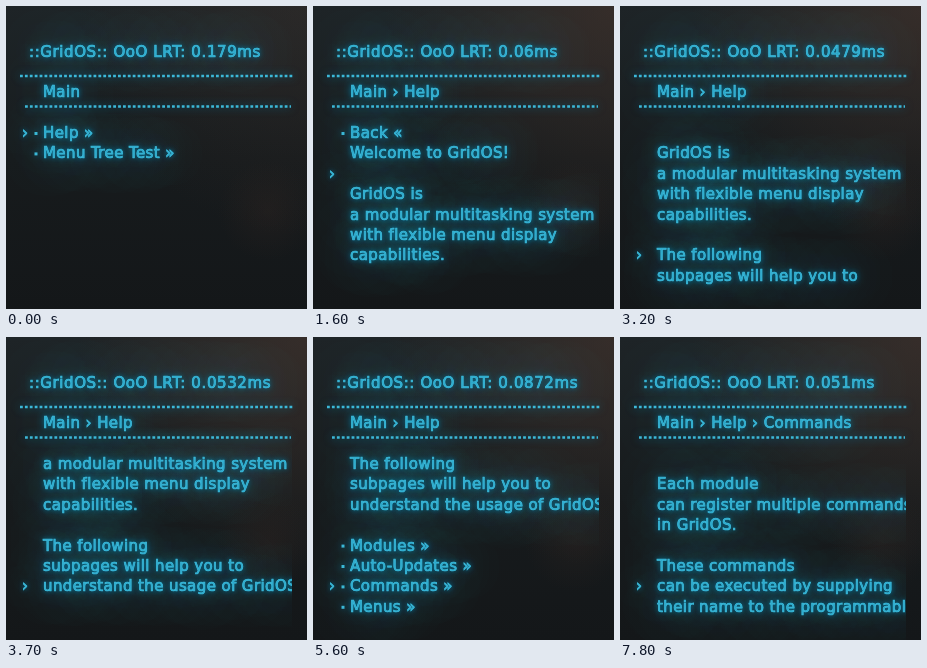
Write an HTML page with a canvas that moves like this. It is 301 px wide and 303 px high and loops after 8000 ms.

```html
<!DOCTYPE html>
<html lang="en">
<head>
<meta charset="utf-8">
<title>GridOS menu</title>
<style>
  html, body { margin: 0; width: 100%; height: 100%; overflow: hidden; background: #15181a; }
  canvas { display: block; }
</style>
</head>
<body>
<canvas id="screen" width="301" height="303"></canvas>
<script>
const W = 301, H = 303, LOOP = 8000;
const ROWS = 8, ROW_HEIGHT = 20.4, FIRST_BASELINE = 132, LAST_CURSOR_ROW = 6;
const ctx = document.getElementById('screen').getContext('2d');

// A leading "*" marks a selectable item with a bullet.
const pages = {
  main: { path: 'Main', lines: ['*Help »', '*Menu Tree Test »'] },
  help: {
    path: 'Main › Help',
    lines: ['*Back «', 'Welcome to GridOS!', '', 'GridOS is',
      'a modular multitasking system', 'with flexible menu display', 'capabilities.', '',
      'The following', 'subpages will help you to', 'understand the usage of GridOS:', '',
      '*Modules »', '*Auto-Updates »', '*Commands »', '*Menus »']
  },
  commands: {
    path: 'Main › Help › Commands',
    lines: ['*Back «', 'About commands:', '', 'Each module',
      'can register multiple commands', 'in GridOS.', '', 'These commands',
      'can be executed by supplying', 'their name to the programmable']
  }
};

// Times at which the cursor reaches line 0, 1, 2, ...
const visits = [
  { page: pages.main, steps: [0] },
  { page: pages.help, steps: [1000, 1300, 1600, 1900, 2100, 2400, 2600, 2900, 3200,
    3400, 3700, 3900, 4200, 4500, 4700] },
  { page: pages.commands, steps: [5700, 6200, 6500, 6700, 6800, 7000, 7200, 7400, 7700] }
];

// Header status: start time, spinner and run time.
const statuses = [
  [0, 'OoO', '0.179'], [100, 'OOo', '0.0535'], [600, 'OoO', '0.0521'], [1300, 'OOo', '0.0588'],
  [1600, 'OoO', '0.06'], [1700, 'OOo', '0.0612'], [2100, 'OoO', '0.0547'], [2400, 'OOo', '0.0539'],
  [2600, 'OoO', '0.0526'], [2900, 'OOo', '0.0561'], [3200, 'OoO', '0.0479'], [3400, 'OOo', '0.0518'],
  [3700, 'OoO', '0.0532'], [4200, 'OOo', '0.0541'], [4500, 'OoO', '0.0529'], [4900, 'OOo', '0.0558'],
  [5600, 'OoO', '0.0872'], [5800, 'OOo', '0.0564'], [6200, 'OoO', '0.0537'], [6700, 'OOo', '0.0516'],
  [6800, 'OoO', '0.0523'], [7000, 'OOo', '0.0544'], [7200, 'OoO', '0.0519'], [7400, 'OOo', '0.0528'],
  [7700, 'OoO', '0.051']
];

function gradient(g, ...stops) {
  stops.forEach(([at, color]) => g.addColorStop(at, color));
  ctx.fillStyle = g;
  ctx.fillRect(0, 0, W, H);
}

function drawBackground(warmth) {
  ctx.shadowBlur = 0;
  gradient(ctx.createLinearGradient(0, 0, 0, H), [0, '#1e2427'], [0.5, '#171b1d'], [1, '#141719']);
  gradient(ctx.createRadialGradient(W, 0, 0, W, 0, 230),
    [0, `rgba(66,50,43,${warmth})`], [1, 'rgba(66,50,43,0)']);
  gradient(ctx.createRadialGradient(262, 205, 0, 262, 205, 50),
    [0, 'rgba(60,42,36,.25)'], [1, 'rgba(60,42,36,0)']);
}

function glow(blur, alpha) {
  ctx.shadowColor = `rgba(0,125,165,${alpha})`;
  ctx.shadowBlur = blur;
}

// Wide haze, close halo, then a thin outline that thickens the letters.
function write(text, x, y) {
  glow(42, 0.85);
  ctx.fillText(text, x, y);
  glow(9, 1);
  ctx.fillText(text, x, y);
  glow(4, 0.9);
  ctx.setLineDash([]);
  ctx.lineWidth = 0.7;
  ctx.strokeText(text, x, y);
}

function dottedLine(x1, x2, y) {
  glow(8, 0.9);
  ctx.setLineDash([2.8, 2.1]);
  ctx.lineWidth = 2.4;
  ctx.beginPath();
  ctx.moveTo(x1, y);
  ctx.lineTo(x2, y);
  ctx.stroke();
}

function drawMenu({ lines }, cursor) {
  const top = Math.max(0, cursor - LAST_CURSOR_ROW);
  lines.slice(top, top + ROWS).forEach((line, row) => {
    const y = FIRST_BASELINE + row * ROW_HEIGHT;
    if (line[0] === '*') {
      glow(6, 1);
      ctx.fillRect(28.5, y - 6, 3, 3);
    }
    write(line.replace('*', ''), 37, y);
    if (top + row === cursor) write('›', 16, y);
  });
}

function draw(t) {
  drawBackground(t < 600 ? 0.35 : 0.65);
  const { page, steps } = visits.findLast(v => v.steps[0] <= t);
  const cursor = steps.findLastIndex(at => at <= t);
  const [, spinner, runTime] = statuses.findLast(([at]) => at <= t);

  ctx.save();
  ctx.font = '15px "DejaVu Sans", sans-serif';
  ctx.fillStyle = ctx.strokeStyle = '#3cb8d8';

  ctx.letterSpacing = '0.6px';
  write(`::GridOS:: ${spinner} LRT: ${runTime}ms`, 23, 51);
  dottedLine(14, 288, 70);
  dottedLine(19, 285, 100.5);

  ctx.beginPath();
  ctx.rect(0, 0, 286, H);
  ctx.clip();
  ctx.letterSpacing = '0.4px';
  write(page.path, 37, 91);
  drawMenu(page, cursor);
  ctx.restore();
}

function frame() {
  draw(performance.now() % LOOP);
  requestAnimationFrame(frame);
}
frame();
</script>
</body>
</html>
```
